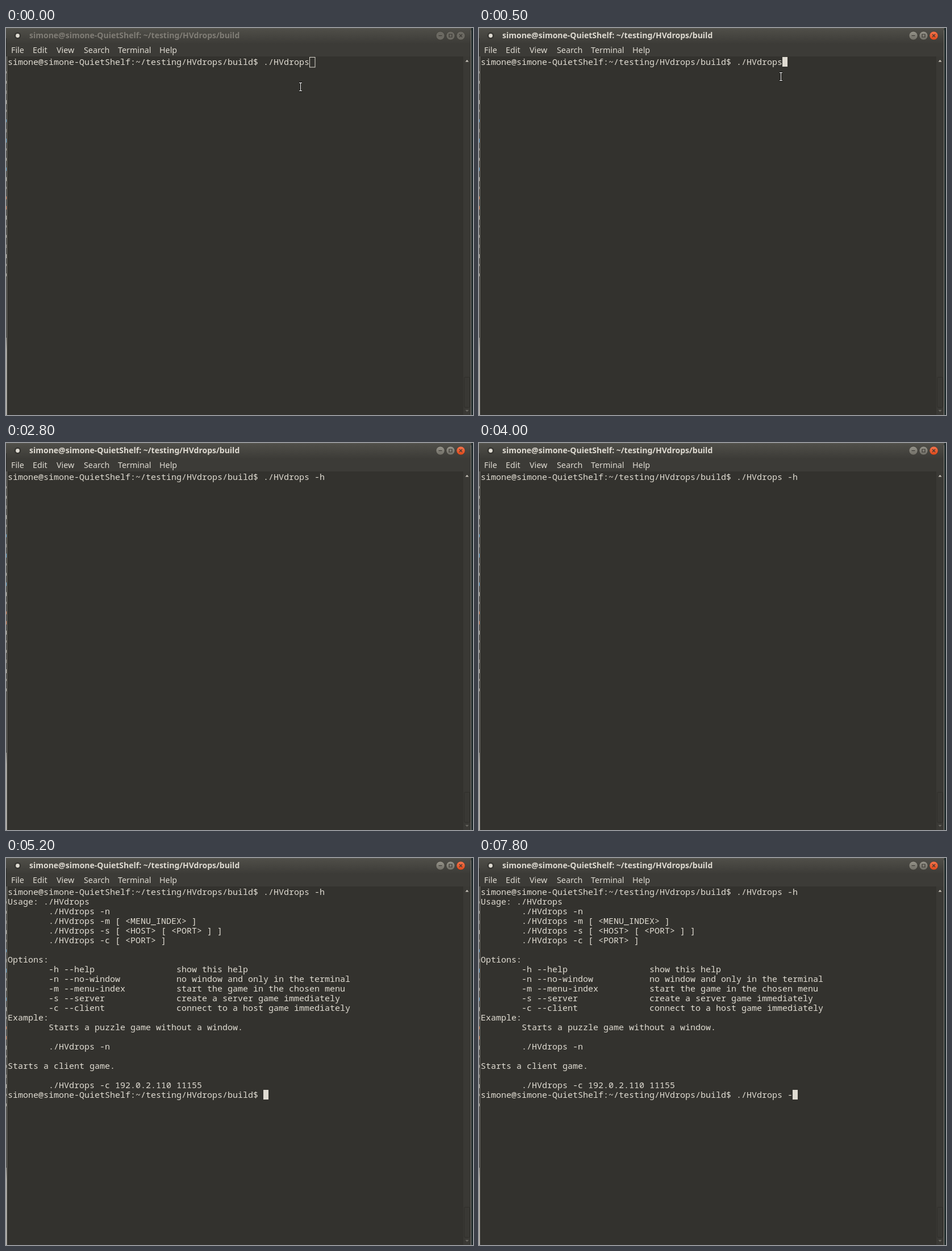
An HTML page that plays this animation: 822 px wide and 681 px high, repeating every 8000 ms.

```html
<!DOCTYPE html>
<html lang="en">
<head>
<meta charset="utf-8">
<title>Terminal</title>
<style>
  html, body { margin: 0; width: 100%; height: 100%; overflow: hidden; background: #33322e; }
  svg { display: block; width: 822px; height: 681px; }
  .ui { font: 14.3px "Noto Sans", "Open Sans", sans-serif; fill: #dfdbd2; }
  .title { font-size: 14px; font-weight: 600; }
  .term { font: 15px "Noto Sans Mono", "DejaVu Sans Mono", monospace; fill: #e0dcd2; }
  .term text { white-space: pre; }
</style>
</head>
<body>
<svg id="stage" viewBox="0 0 822 681" xmlns="http://www.w3.org/2000/svg">
  <defs>
    <linearGradient id="bar" x2="0" y2="1">
      <stop offset="0" stop-color="#504f49"/><stop offset="1" stop-color="#3c3b37"/>
    </linearGradient>
    <linearGradient id="grey" x2="0" y2="1">
      <stop offset="0" stop-color="#96948b"/><stop offset="1" stop-color="#6f6d65"/>
    </linearGradient>
    <linearGradient id="red" x2="0" y2="1">
      <stop offset="0" stop-color="#f4764f"/><stop offset="1" stop-color="#dd4718"/>
    </linearGradient>
    <linearGradient id="pale" x2="0" y2="1">
      <stop offset="0" stop-color="#77756f"/><stop offset=".15" stop-color="#bdbab3"/><stop offset="1" stop-color="#c9c6bf"/>
    </linearGradient>
  </defs>
  <rect width="822" height="681" fill="#33322e"/>
  <rect width="819" height="28" fill="url(#bar)"/>
  <rect width="819" height="1" fill="#5a5952"/>
  <rect y="28" width="819" height="22" fill="#3c3b37"/>

  <!-- window edges -->
  <rect y="18" width="1" height="663" fill="#2b2c2b"/>
  <g id="specks"></g>
  <rect x="1" y="50" width="1" height="631" fill="#8c8a84"/>
  <rect y="545" width="1" height="136" fill="url(#pale)"/>
  <rect x="818" y="4" width="1" height="677" fill="#85837d"/>
  <rect x="819" width="3" height="681" fill="#202b2c"/>

  <!-- scrollbar -->
  <rect x="805" y="50" width="13" height="631" fill="#3a3935"/>
  <rect x="806.5" y="614.5" width="10" height="53" rx="2" fill="#393834" stroke="#2f2e2a"/>
  <path d="M808.5 59.5 L811.5 56 L814.5 59.5Z" fill="#c9c5bc"/>
  <path d="M808.5 672 L811.5 675.5 L814.5 672Z" fill="#686660"/>

  <circle cx="20.5" cy="13.5" r="6" fill="#373632"/>
  <circle cx="20.5" cy="13.5" r="3.4" fill="#dfdbd2"/>
  <text id="title" class="ui title" x="41" y="18"></text>
  <g id="menu" class="ui"></g>
  <g id="buttons"></g>
  <g id="lines" class="term"></g>
  <rect id="cursor"/>
  <g id="pointer" fill="none">
    <path d="M-3 -7.5H3M0 -7.5V7.5M-3 7.5H3" stroke="#1d1c1a" stroke-width="3"/>
    <path d="M-2.5 -7H2.5M0 -7V7M-2.5 7H2.5" stroke="#fff"/>
  </g>
</svg>
<script>
const CELL = 9, ROW = 17, LEFT = 3, TOP = 51, LOOP = 8000;
const APP = './HVdrops', PATH = '~/testing/HVdrops/build';
const USER = 'simone@simone-QuietShelf', PROMPT = `${USER}:${PATH}$ `;
const $ = id => document.getElementById(id);

function add(parent, tag, attrs, text = '') {
  const node = document.createElementNS('http://www.w3.org/2000/svg', tag);
  put(node, attrs);
  node.textContent = text;
  return parent.appendChild(node);
}

function put(node, attrs) {
  for (const key in attrs) node.setAttribute(key, attrs[key]);
}

const indent = text => ' '.repeat(8) + text;
const option = (flag, about) => indent(flag).padEnd(33) + about;
const OUTPUT = [
  `Usage: ${APP}`,
  indent(`${APP} -n`),
  indent(`${APP} -m [ <MENU_INDEX> ]`),
  indent(`${APP} -s [ <HOST> [ <PORT> ] ]`),
  indent(`${APP} -c [ <PORT> ]`),
  '',
  'Options:',
  option('-h --help', 'show this help'),
  option('-n --no-window', 'no window and only in the terminal'),
  option('-m --menu-index', 'start the game in the chosen menu'),
  option('-s --server', 'create a server game immediately'),
  option('-c --client', 'connect to a host game immediately'),
  'Example:',
  indent('Starts a puzzle game without a window.'),
  '',
  indent(`${APP} -n`),
  '',
  'Starts a client game.',
  '',
  indent(`${APP} -c 192.0.2.110 11155`)
];
const LAST = OUTPUT.length + 1;

// start time, typed command, cursor shown
const FIRST_PROMPT = [
  [0, APP, true], [1100, APP, false], [1400, `${APP} `, true],
  [1800, `${APP} -`, true], [2200, `${APP} -h`, true], [2800, `${APP} -h`, false],
  [3400, `${APP} -h`, true], [4000, `${APP} -h`, false]
];
const SECOND_PROMPT = [
  [4100, '', true], [4600, '', false], [5200, '', true],
  [5900, `${APP} -h`, true], [6400, `${APP} -h`, false],
  [6600, `${APP} -`, true], [7200, `${APP} -`, false], [7800, `${APP} -`, true]
];

$('title').textContent = `${USER}: ${PATH}`;
[['File', 9], ['Edit', 47], ['View', 89], ['Search', 137], ['Terminal', 197], ['Help', 270]]
  .forEach(([name, x]) => add($('menu'), 'text', { x, y: 44 }, name));

// slivers of the window behind
const TINTS = ['#85837c', '#9a9890', '#77756f', '#a5a39b'];
const BLUE = '#3f86b5', ORANGE = '#c0643c';
const ACCENTS = { 5: BLUE, 7: BLUE, 10: BLUE, 13: ORANGE, 14: ORANGE };
for (let i = 0; i < 22; i++) {
  add($('specks'), 'rect', {
    x: 0, y: 76 + i * 16.95, width: 1, height: 4 + i * 5 % 4, fill: ACCENTS[i] || TINTS[i % 4]
  });
}

const GLYPHS = ['M-3 0H3', 'M-2.5 -2.5H2.5V2.5H-2.5Z', 'M-2.5 -2.5L2.5 2.5M2.5 -2.5L-2.5 2.5'];
const buttons = GLYPHS.map((d, i) => {
  const group = add($('buttons'), 'g', { transform: `translate(${764.5 + i * 18} 13.5)` });
  const disc = add(group, 'circle', { r: 7.6, stroke: '#3a3833', 'stroke-width': 0.7 });
  add(group, 'path', { d, fill: 'none', stroke: '#3a3833', 'stroke-width': 1.2 });
  return disc;
});

const lines = Array.from({ length: LAST + 1 }, (_, i) =>
  add($('lines'), 'text', { x: LEFT, y: TOP + 14 + i * ROW }));

function drawCursor(row, col, shown, active) {
  const edge = active ? 0 : 0.5;
  put($('cursor'), {
    x: LEFT + col * CELL + edge, y: TOP + row * ROW + edge,
    width: CELL + edge, height: ROW + edge,
    fill: active ? '#dfdbd2' : 'none', stroke: active ? 'none' : '#dfdbd2',
    visibility: shown ? 'visible' : 'hidden'
  });
}

function drawPointer(t) {
  const p = Math.min(3, Math.floor(t / 100)) / 3;
  put($('pointer'), {
    transform: `translate(${Math.round(518 + 13 * p) + 0.5} ${103.5 - 18 * p})`,
    visibility: t < 1400 ? 'visible' : 'hidden'
  });
}

function draw(t) {
  const active = t >= 500, done = t >= 4100;
  const [, typed, shown] = (done ? SECOND_PROMPT : FIRST_PROMPT).findLast(step => step[0] <= t);
  const screen = done ? [`${PROMPT}${APP} -h`, ...OUTPUT, PROMPT + typed] : [PROMPT + typed];
  lines.forEach((line, i) => {
    const text = screen[i] || '';
    if (line.textContent !== text) line.textContent = text;
  });
  drawCursor(done ? LAST : 0, PROMPT.length + typed.length, shown, active);
  drawPointer(t);
  $('title').style.fill = active ? '#dfdbd2' : '#807d76';
  buttons.forEach((disc, i) =>
    disc.setAttribute('fill', !active ? '#6b6962' : i === 2 ? 'url(#red)' : 'url(#grey)'));
}

const start = performance.now();
function tick() {
  draw((performance.now() - start) % LOOP);
  requestAnimationFrame(tick);
}
tick();
</script>
</body>
</html>
```
